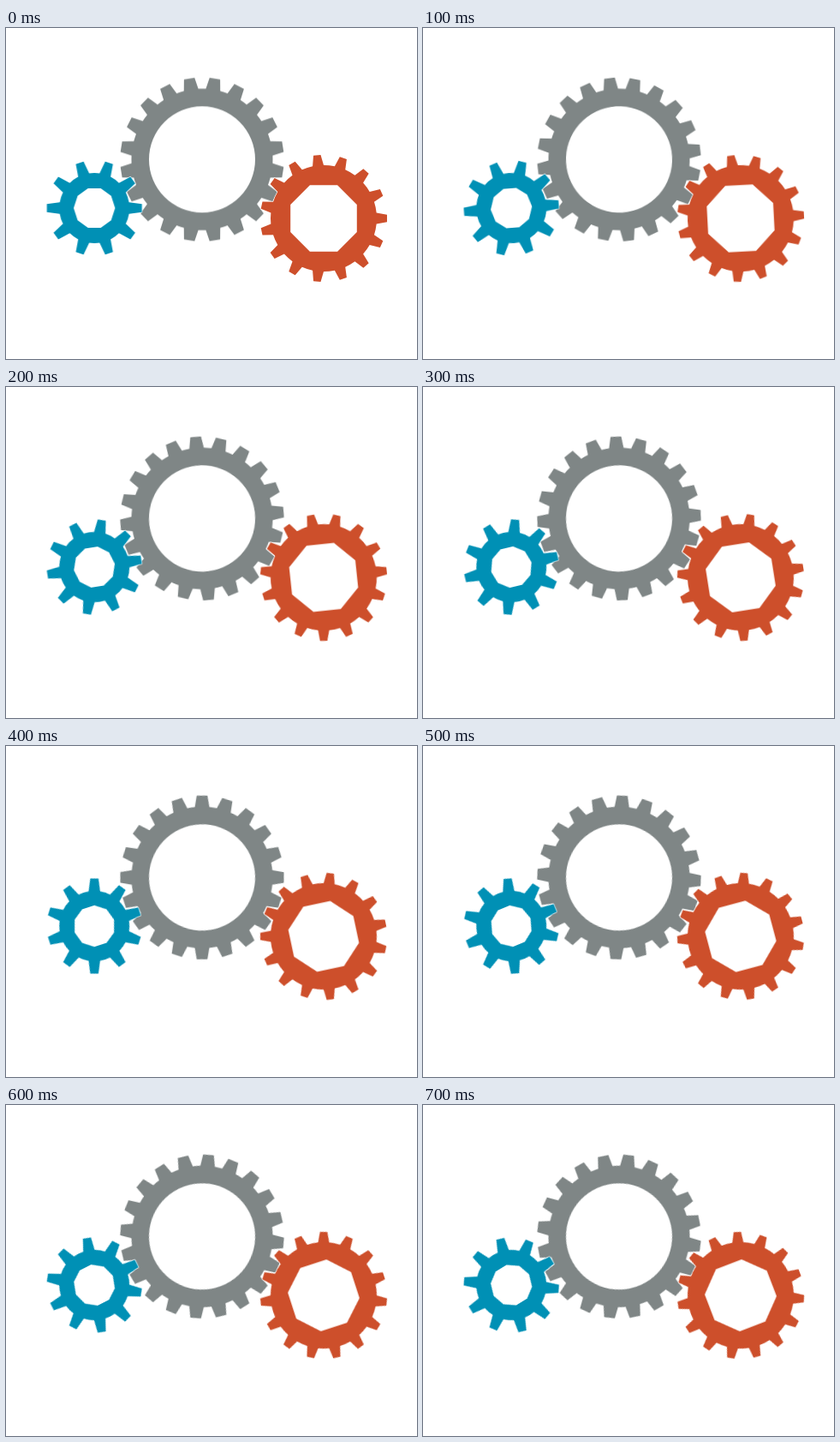
An HTML page for the animation above (800 ms loop, 480 by 386 pixels).

```html
<!DOCTYPE html>
<html lang="en">
<head>
<meta charset="utf-8">
<title>Turning gears</title>
<style>
  html, body { margin: 0; width: 100%; height: 100%; overflow: hidden; background: #fff; }
  svg { display: block; }
  path { stroke: #fff; stroke-width: 1.2; paint-order: stroke; fill-rule: evenodd; }
</style>
</head>
<body>
<svg id="stage" width="480" height="386" viewBox="0 0 480 386"></svg>
<script>
const NS = "http://www.w3.org/2000/svg";
const LOOP = 800, STEPS = 8;

// tip and base are tooth widths; phase is the angle of one tooth, clockwise from the top
const gears = [
  { x: 229, y: 153.3, teeth: 20, outer: 95.5, root: 82.5, tip: 12.5, base: 17, phase: 9,
    dir: 1, hole: 62, color: "#7f8686" },
  { x: 103.2, y: 210, teeth: 10, outer: 55.5, root: 41, tip: 9.5, base: 13.5, phase: 18,
    dir: -1, hole: 24.2, sides: 10, holePhase: 18, color: "#0090b5" },
  { x: 371, y: 222, teeth: 15, outer: 74, root: 62, tip: 8.5, base: 13, phase: 18,
    dir: -1, hole: 42, sides: 8, holePhase: 22.5, color: "#cd4f2b" }
];

// Point "up" along a spoke at the given angle, shifted sideways by "side"
function spoke(deg, up, side = 0) {
  const a = deg * Math.PI / 180, s = Math.sin(a), c = Math.cos(a);
  return `${(side * c + up * s).toFixed(2)} ${(side * s - up * c).toFixed(2)}`;
}

function rim({ teeth, outer, root, tip, base, phase }) {
  const foot = Math.sqrt(root * root - base * base / 4);
  let d = "";
  for (let i = 0; i < teeth; i++) {
    const a = phase + i * 360 / teeth;
    d += i ? `A${root} ${root} 0 0 1 ` : "M";
    d += spoke(a, foot, -base / 2) + "L" + spoke(a, outer, -tip / 2) +
         "L" + spoke(a, outer, tip / 2) + "L" + spoke(a, foot, base / 2);
  }
  return d + `A${root} ${root} 0 0 1 ${spoke(phase, foot, -base / 2)}Z`;
}

function bore({ hole, sides, holePhase }) {
  if (!sides) return `M0 ${-hole}A${hole} ${hole} 0 1 1 0 ${hole}A${hole} ${hole} 0 1 1 0 ${-hole}Z`;
  const points = Array.from({ length: sides }, (_, i) => spoke(holePhase + i * 360 / sides, hole));
  return "M" + points.join("L") + "Z";
}

function addGear(gear) {
  const mount = document.createElementNS(NS, "g");
  const wheel = document.createElementNS(NS, "path");
  mount.setAttribute("transform", `translate(${gear.x} ${gear.y})`);
  wheel.setAttribute("d", rim(gear) + bore(gear));
  wheel.setAttribute("fill", gear.color);
  mount.append(wheel);
  document.getElementById("stage").append(mount);

  // Each loop advances by exactly one tooth
  const turn = gear.dir * 360 / gear.teeth;
  wheel.animate(
    [{ transform: "rotate(0deg)" }, { transform: `rotate(${turn}deg)` }],
    { duration: LOOP, iterations: Infinity, easing: `steps(${STEPS}, end)` }
  );
}

gears.forEach(addGear);
</script>
</body>
</html>
```
